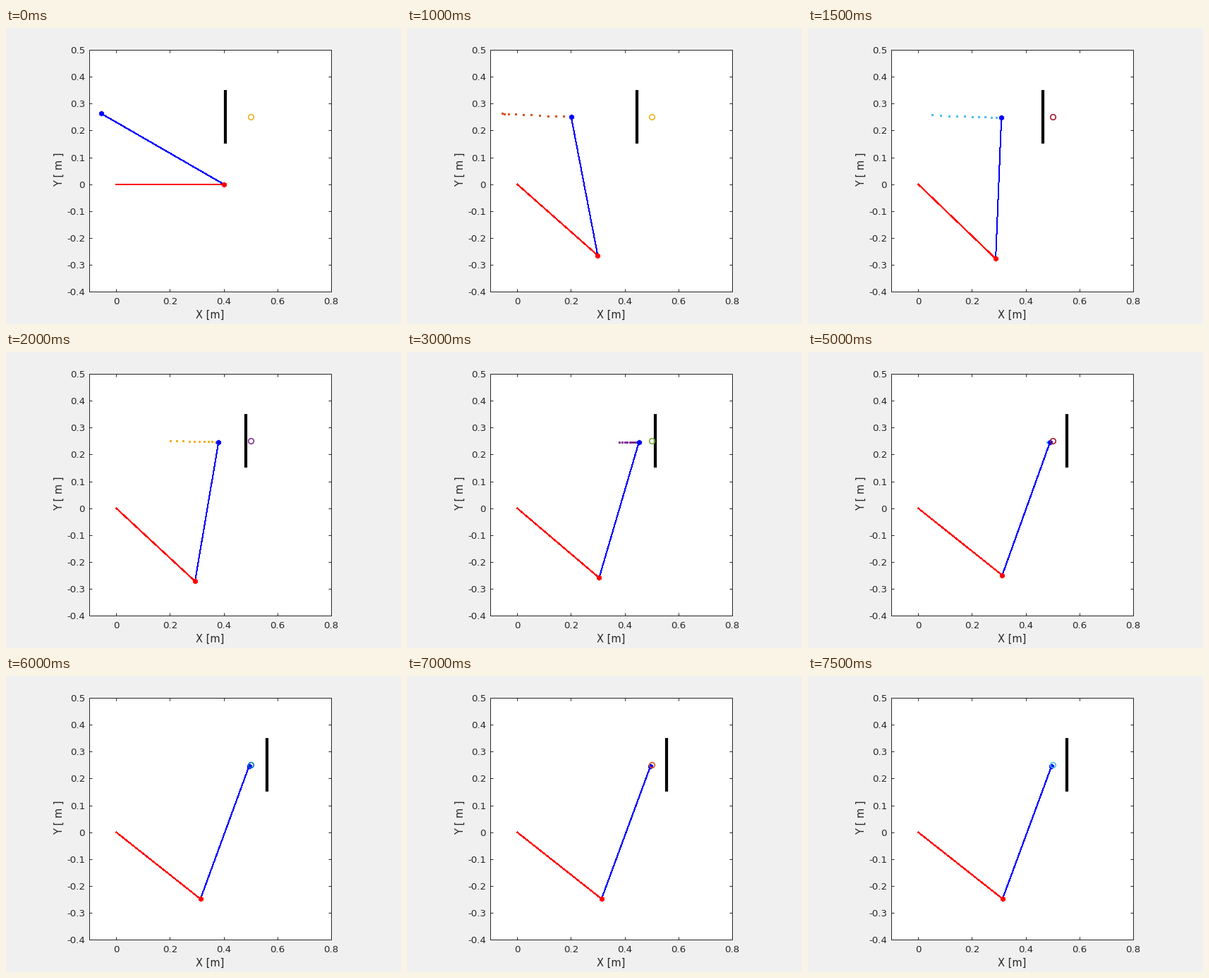
A matplotlib script for the animation above (8000 ms loop, 560 px wide and 420 px high).

```python
import numpy as np
import matplotlib.pyplot as plt
from matplotlib.animation import FuncAnimation
from matplotlib.markers import MarkerStyle

W, H, DPI = 560, 420, 100
PX = 72 / DPI                       # points per pixel
FRAMES, STEP = 16, 0.5              # seconds between pictures
INK = "#262626"
COLORS = ["#0072bd", "#d95319", "#edb120", "#7e2f8e",
          "#77ac30", "#4dbeee", "#a2142f"]
L1, L2 = 0.4, 0.526                 # link lengths

plt.rcParams["font.family"] = "DejaVu Sans"
plt.rcParams["axes.unicode_minus"] = False


def tip(t):
    """Overdamped approach of the hand to its goal."""
    p, q = 2.95, 0.98
    r = (p * np.exp(-q * t) - q * np.exp(-p * t)) / (p - q)
    return 0.4965 - 0.552 * r, 0.2455 + 0.0175 * r ** 1.7


def elbow(x, y):
    """Elbow-down inverse kinematics."""
    d = np.hypot(x, y)
    bend = np.arccos((L1 ** 2 + d ** 2 - L2 ** 2) / (2 * L1 * d))
    a = np.arctan2(y, x) - bend
    return L1 * np.cos(a), L1 * np.sin(a)


def wall_x(t):
    return 0.4 + 0.16 * np.sin(0.04 + 0.247 * t)


fig = plt.figure(figsize=(W / DPI, H / DPI), dpi=DPI, facecolor="#f0f0f0")
ax = fig.add_axes([118.1 / W, 45.9 / H, 343 / W, 343 / H])
ax.set(xlim=(-0.1, 0.8), ylim=(-0.4, 0.5))
ax.set_xticks(np.arange(5) * 0.2, ["0", "0.2", "0.4", "0.6", "0.8"])
y_ticks = np.arange(-4, 6) / 10
ax.set_yticks(y_ticks, [f"{v:g}" for v in y_ticks])
ax.tick_params(direction="in", top=True, right=True, length=4 * PX,
               width=PX, color=INK, labelcolor=INK, labelsize=13.33 * PX)
ax.tick_params(axis="x", pad=8.4 * PX)
ax.tick_params(axis="y", pad=6 * PX)
for spine in ax.spines.values():
    spine.set(color=INK, linewidth=PX)

label = dict(color=INK, fontsize=14.67 * PX, ha="center", va="center")
fig.text(289.6 / W, 1 - 407 / H, "X [m]", **label)
fig.text(75 / W, 1 - 201.2 / H, "Y [ m ]", rotation=90, **label)


def line(width=1, **kw):
    return ax.plot([], [], lw=width * PX, **kw)[0]


def dots(marker, size, edge=0, **kw):
    return ax.plot([], [], ls="", marker=marker, ms=size * PX,
                   mew=edge * PX, **kw)[0]


def joint(color):
    """Heavy hexagram whose mitred corners stick out as spikes."""
    star = MarkerStyle((6, 1, 0), joinstyle="miter")
    return dots(star, 6.4, 2.4, mec=color, mfc="none", zorder=5)


wall = line(4.2, color="k", solid_capstyle="butt", zorder=3)
upper = line(color="r", antialiased=False, zorder=3)
fore = line(color="b", antialiased=False, zorder=3.1)
trail = dots("s", 3, zorder=4)
hand = joint("b")
knee = joint("r")
goal = dots("o", 7.6, 1.6, mfc="none", zorder=6)


def draw(i):
    t = i * STEP
    x, y = tip(t)
    ex, ey = elbow(x, y)
    wall.set_data([wall_x(t)] * 2, [0.15, 0.35])
    upper.set_data([0, ex], [0, ey])
    fore.set_data([ex, x], [ey, y])
    hand.set_data([x], [y])
    knee.set_data([ex], [ey])

    # the trail keeps the last second, one dot per 0.1 s
    n = min(10, 5 * i)
    trail.set_data(*tip(t - np.arange(n + 1) * 0.1))
    k = 4 * i + 1 if i else 2       # colour cycle advances by four
    trail.set_color(COLORS[(k - 1) % 7])
    goal.set_data([0.5], [0.25])
    goal.set_markeredgecolor(COLORS[k % 7])
    return [wall, upper, fore, trail, hand, knee, goal]


anim = FuncAnimation(fig, draw, frames=FRAMES, interval=500,
                     repeat=True, repeat_delay=0, blit=False)
plt.show()
```
